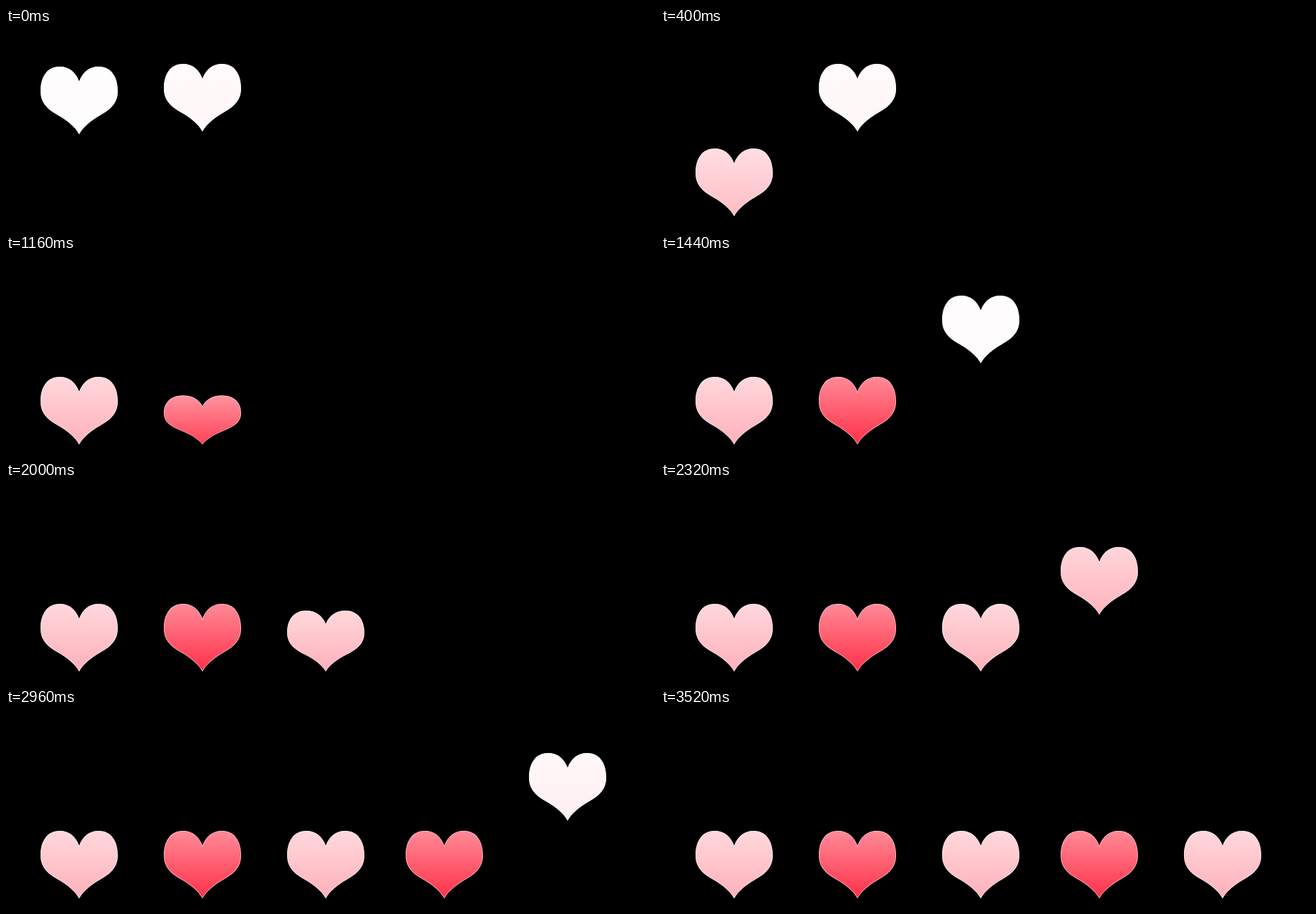
An HTML page with a canvas that plays this animation: 958 by 294 pixels, repeating every 4000 ms.

```html
<!DOCTYPE html>
<html lang="en">
<head>
<meta charset="utf-8">
<title>Bouncing hearts</title>
<style>
  html, body { margin: 0; height: 100%; overflow: hidden; background: #000; }
  canvas { display: block; }
</style>
</head>
<body>
<canvas id="stage" width="958" height="294"></canvas>
<script>
const ctx = document.getElementById('stage').getContext('2d');
const LOOP = 4000, STEP = 40, SLOT = 720;
const FLOOR = 280, HEIGHT = 100;
const FALL = 406, REBOUND = 460, LAND = 620, REST = 673;

const PINK = [[255, 216, 220], [255, 176, 186]];
const RED = [[255, 138, 151], [255, 48, 72]];

// phase: how far into its fall a heart is when it first shows
const hearts = [
  { x: 51, phase: 65, colors: PINK },
  { x: 233, phase: 0, colors: RED, waits: true },
  { x: 415, phase: 86, colors: PINK },
  { x: 590, phase: 59, colors: RED },
  { x: 772, phase: 33, colors: PINK },
];

const shape = new Path2D(
  'M57 22C52 8 42 0 28 0C10 0 0 15 0 36C0 52 8 62 26 72C40 80 51 89 57 100' +
  'C63 89 74 80 88 72C106 62 114 52 114 36C114 15 104 0 86 0C72 0 62 8 57 22Z');

const arc = (t, from, to) => Math.sin(Math.PI * (t - from) / (to - from));

function pose(t) {
  if (t < FALL) return { lift: 127 * Math.cos(Math.PI / 2 * t / FALL), squash: 1 };
  if (t < REBOUND) return { lift: 0, squash: 1 - 0.3 * arc(t, FALL, REBOUND) };
  if (t < LAND) return { lift: 21 * arc(t, REBOUND, LAND), squash: 1 };
  if (t < REST) return { lift: 0, squash: 1 - 0.1 * arc(t, LAND, REST) };
  return { lift: 0, squash: 1 };
}

const fade = (color, amount) =>
  `rgb(${color.map(c => Math.round(255 + (c - 255) * amount)).join()})`;

function drawHeart({ x, phase, colors, waits }, elapsed) {
  if (elapsed < 0 && !waits) return;
  const age = Math.max(0, elapsed);
  const { lift, squash } = pose(age + phase);
  const amount = Math.min(1, 0.04 + age / 500);
  const fill = ctx.createLinearGradient(0, 0, 0, HEIGHT);
  colors.forEach((color, i) => fill.addColorStop(i, fade(color, amount)));

  ctx.save();
  ctx.translate(x, FLOOR - lift - HEIGHT * squash);
  ctx.scale(1, squash);
  ctx.fillStyle = fill;
  ctx.fill(shape);
  // pale inner rim
  ctx.clip(shape);
  ctx.strokeStyle = 'rgba(255, 255, 255, 0.6)';
  ctx.lineWidth = 1.6;
  ctx.stroke(shape);
  ctx.restore();
}

function render() {
  const now = Math.floor(performance.now() % LOOP / STEP) * STEP;
  ctx.fillStyle = '#000';
  ctx.fillRect(0, 0, 958, 294);
  hearts.forEach((heart, i) => drawHeart(heart, now - i * SLOT));
  requestAnimationFrame(render);
}
render();
</script>
</body>
</html>
```
